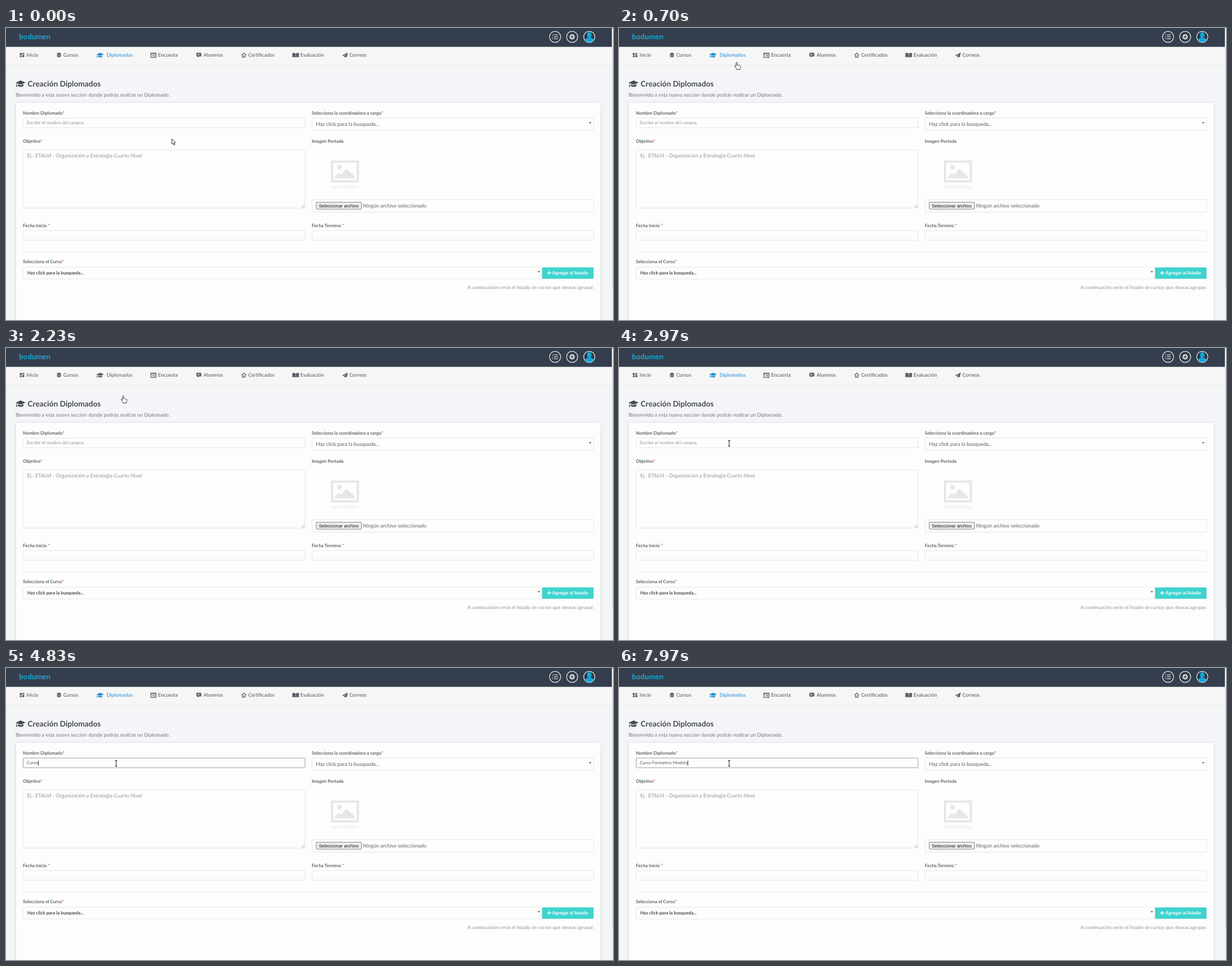
An HTML page for the animation above (8000 ms loop, 1080 px wide and 519 px high).

```html
<!DOCTYPE html>
<html lang="es">
<head>
<meta charset="utf-8">
<title>Creación Diplomados</title>
<style>
html, body { margin: 0; width: 100%; height: 100%; overflow: hidden; background: #f4f5f8; }
svg { display: block; width: 1080px; height: 519px; }
text { font-family: Lato, "Open Sans", sans-serif; font-size: 9px; fill: #5a5f66; text-rendering: geometricPrecision; white-space: pre; }
.nav text { font-size: 8.9px; fill: #4c525c; }
.nav { color: #555c67; }
.label { font-size: 8.1px; font-weight: 700; fill: #5f6469; }
.label tspan { fill: #e2456b; }
.small { font-size: 7.8px; }
.hint { fill: #8f9497; }
.field { fill: #fdfdfd; stroke: #e4e4e1; }
.cursor path { fill: #fff; stroke: #222; stroke-width: .9; stroke-linejoin: round; }
</style>
</head>
<body>
<svg viewBox="0 0 1080 519">
  <defs>
    <filter id="shadow" x="-10%" y="-10%" width="120%" height="120%">
      <feDropShadow dx="0" dy="1" stdDeviation="2.5" flood-color="#5a6478" flood-opacity=".25"/>
    </filter>
    <g id="cap" fill="currentColor">
      <path d="M0 3L7 0l7 3-7 3z"/>
      <path d="M3 5.2L7 7l4-1.8v2.6c-2 1.6-6 1.6-8 0z"/>
      <path d="M.8 3.6h.8v3l.6 2.4H.3l.5-2.4z"/>
    </g>
    <path id="down" d="M0 0h5L2.5 3z" fill="#777"/>
  </defs>

  <rect width="1080" height="519" fill="#f4f5f8"/>
  <rect y="33" width="1080" height="32" fill="#f6f6f6"/>
  <path d="M0 65.5H1078" stroke="#eceade"/>
  <rect width="1078" height="33.5" fill="#343e4d"/>
  <text x="23" y="20" style="font-size:13.3px;font-weight:700;fill:#1ba6d6">bodumen</text>

  <g fill="none" stroke="#d9dce0" stroke-width="1.3">
    <circle cx="977" cy="15.7" r="9.9"/>
    <circle cx="1007.3" cy="15.7" r="9.9"/>
    <path d="M975 12.2h7M975 15.7h7M975 19.2h7M971.8 12.2h1.6M971.8 15.7h1.6M971.8 19.2h1.6"/>
    <circle cx="1007.3" cy="15.7" r="4.7" fill="#d9dce0" stroke="none"/>
    <path d="M1004.6 15.7h5.4M1007.3 13v5.4" stroke="#343e4d"/>
    <circle cx="1037.8" cy="15.7" r="9.9" fill="#2c3644"/>
    <path d="M1030 21.2q1-3.2 5.2-4h5.2q4.2.8 5.2 4a9.4 9.4 0 0 1-15.6 0z" fill="#18a5d8" stroke="none"/>
    <ellipse cx="1037.8" cy="12.3" rx="4.1" ry="5.2" fill="#18a5d8" stroke="none"/>
  </g>

  <g class="nav">
    <g fill="currentColor">
      <path d="M24.5 44.5h3.5v4h-3.5zM29 44.5h3.5v2.3H29zM24.5 49.5H28v2.3h-3.5zM29 47.8h3.5v4H29z"/>
      <path d="M94.2 43.5l4.3 2.4-4.3 2.5-4.3-2.5zM89.9 48.2l1.5-.8 2.8 1.6 2.8-1.6 1.5.8-4.3 2.5zM89.9 50.2l1.3-.7 3 1.6 3-1.6 1.3.7-4.3 2.4z"/>
      <path d="M338.8 44h8.7v6.5h-4l-2.3 2v-2h-2.4z"/>
      <path d="M509.5 44.6q3-.8 5.6.6v7.3q-2.6-1.4-5.6-.6zM521.3 44.6q-3-.8-5.6.6v7.3q2.6-1.4 5.6-.6z"/>
      <path d="M608 43.5l-1.6 8.8-3-1.3-1.8 2v-2.7l4.7-5.2-5.7 4.7-2.6-1.1z"/>
    </g>
    <path d="M340.5 46.4h5.3M340.5 48.3h3.6" stroke="#f6f6f6" stroke-width=".8"/>
    <g fill="none" stroke="currentColor" stroke-width="1.1">
      <rect x="257.5" y="44.5" width="9.5" height="8"/>
      <path d="M257.5 46h9.5M259.3 48.2h1.2M261.6 48.2h4M259.3 50.3h1.2M261.6 50.3h4"/>
      <path d="M419 48.2l4-3.8 4 3.8M420.4 47.5v4.4h5.2v-4.4M422 49.6h2"/>
    </g>
    <text x="36.5" y="51">Inicio</text>
    <text x="102" y="51">Cursos</text>
    <g id="active">
      <use href="#cap" transform="translate(161 44) scale(.93)"/>
      <text x="179" y="51" style="fill:currentColor">Diplomados</text>
    </g>
    <text x="270.5" y="51">Encuesta</text>
    <text x="351.5" y="51">Alumnos</text>
    <text x="431" y="51">Certificados</text>
    <text x="524" y="51">Evaluación</text>
    <text x="611" y="51">Correos</text>
  </g>

  <use href="#cap" transform="translate(17.3 93.3) scale(1.25)" color="#474c52"/>
  <text x="38.5" y="104" style="font-size:13.7px;font-weight:700;fill:#474c52">Creación Diplomados</text>
  <text x="17" y="122" style="fill:#73787d">Bienvenido a esta nueva seccion donde podrás realizar un Diplomado.</text>

  <rect x="18" y="133" width="1040" height="400" rx="2" fill="#fdfdfd" filter="url(#shadow)"/>

  <text class="label" x="30" y="153.5">Nombre Diplomado<tspan>*</tspan></text>
  <rect class="field" id="name" x="30.5" y="160" width="501.5" height="17.2" rx="1"/>
  <text class="small" id="typed" x="37" y="171"></text>
  <rect id="caret" y="164.5" width=".9" height="9" fill="#222"/>

  <text class="label" x="544" y="153.5">Selecciona la coordinadora a cargo<tspan>*</tspan></text>
  <rect class="field" x="544.5" y="160" width="501.2" height="21.5" rx="1"/>
  <text x="551.5" y="173.5" style="font-size:9.2px">Haz click para la busqueda...</text>
  <use href="#down" x="1037" y="167.2"/>

  <text class="label" x="30" y="204">Objetivo<tspan>*</tspan></text>
  <rect class="field" x="30.5" y="217" width="501.5" height="103" rx="1"/>
  <text class="hint" x="37.7" y="230" style="font-size:9.1px">Ej : ETALVI - Organización y Estrategia Cuarto Nivel</text>
  <path d="M526 319l5-5M529 319l2-2" stroke="#888" stroke-width=".8"/>

  <text class="label" x="544" y="204">Imagen Portada</text>
  <g fill="#e6e6e6">
    <path fill-rule="evenodd" d="M578 235.5h50v39h-50zM582 239.5v31h42v-31z"/>
    <circle cx="593.5" cy="247.5" r="4"/>
    <path d="M585.5 267.5v-4l6.5-6.5 4 4 9.500-11 15 14v3.500z"/>
  </g>
  <text x="578.5" y="285.500" style="font-size:8.300px;fill:#e6e6e6">SIN IMAGEN</text>
  <rect class="field" x="544.5" y="305" width="501.2" height="22" rx="1"/>
  <rect x="552" y="309.7" width="80.5" height="12.300" rx="1" fill="#efefef" stroke="#777" stroke-width=".9"/>
  <text x="556.700" y="318.800" style="font:8.140px 'Liberation Sans',Arial,sans-serif;fill:#111">Seleccionar archivo</text>
  <text x="635.300" y="319">Ningún archivo seleccionado</text>

  <text class="label" x="30" y="353.5">Fecha Inicio <tspan>*</tspan></text>
  <rect class="field" x="30.5" y="360" width="501.5" height="17" rx="1"/>
  <text class="label" x="544" y="353.5">Fecha Termino <tspan>*</tspan></text>
  <rect class="field" x="544.5" y="360" width="501.2" height="17" rx="1"/>
  <path d="M30 398H1046" stroke="#ececf0"/>

  <text class="label" x="30" y="418">Selecciona el Curso<tspan>*</tspan></text>
  <rect class="field" x="30.5" y="425" width="923" height="21" rx="1"/>
  <text class="label" x="37.7" y="438.3" style="fill:#44494e">Haz click para la busqueda...</text>
  <use href="#down" x="945.5" y="432"/>
  <rect x="954" y="425.600" width="91.500" height="20.200" rx="1" fill="#40d3cf"/>
  <path d="M963 435.300h7M966.500 431.800v7" stroke="#fff" stroke-width="1.500"/>
  <text x="972" y="438.300" style="font-size:8.270px;font-weight:700;fill:#fff">Agregar al listado</text>
  <text class="hint" x="1046" y="464" text-anchor="end" style="font-size:8.450px">A continuación verás el listado de cursos que deseas agrupar.</text>
  <text class="label" x="32" y="524.500">Listado</text>

  <rect x="1078" width="2" height="519" fill="#f1f1f2"/>
  <rect x="1078.700" y="34" width="1.300" height="430" fill="#d3d5d8"/>

  <g id="menu">
    <rect x="147" y="65" width="116" height="60" fill="#fdfdfd" filter="url(#shadow)"/>
    <text id="create" x="161" y="86.300" style="font-size:8.900px">Crear Diplomado</text>
    <text x="161" y="107.300" style="font-size:8.900px">Editar Diplomado</text>
  </g>

  <g id="cursor" class="cursor">
    <path id="arrow" d="M0 0v9.500l2.200-2 1.600 3.600 1.600-.7-1.600-3.500h3z"/>
    <path id="hand" d="M-1.200 1.200a1.100 1.100 0 0 1 2.200 0V5l1.200-.2.900.5 1.200-.1.800.7 1 .1c.6.4.6 1 .6 1.600 0 2-.4 2.600-.9 3.600v1.600H-.3v-1.200C-1.600 10-2.600 8.600-3.400 7.300c-.5-1 .4-1.600 1.100-1l1.100 1.100z"/>
    <path id="beam" d="M-2-5h1.500l.5.500.500-.500H2M0-4.500v9M-2 5h1.500l.5-.5.500.500H2" style="fill:none;stroke-width:1.100"/>
  </g>
</svg>
<script>
const LOOP = 8000, BLUE = '#1c8fd2', DARK = '#555c67';
const $ = id => document.getElementById(id);
const TITLE = 'Curso Formativo Modelo';
const HINT = 'Escribe el nombre del campus';

// Time of each key press
const KEYS = [4030, 4300, 4470, 4640, 4800, 5030, 5370, 5530, 5700, 5870, 6030,
  6230, 6400, 6570, 6730, 6970, 7230, 7400, 7570, 7670, 7800, 7930];

// Pointer stops: time, x, y
const STOPS = [[0, 295, 197], [60, 295, 197], [670, 209.5, 61], [860, 209.5, 61],
  [1200, 207, 86], [1700, 207, 86], [2070, 208.5, 85], [2230, 208.5, 85],
  [2950, 196, 169.500], [LOOP, 196, 169.500]];

const clamp = v => Math.max(0, Math.min(1, v));
const ramp = (t, start, length) => clamp((t - start) / length);
const ease = p => p * p * (3 - 2 * p);
const show = (id, on) => $(id).style.display = on ? '' : 'none';

function pointer(t) {
  const i = STOPS.findIndex(s => s[0] > t);
  const [t0, x0, y0] = STOPS[i - 1], [t1, x1, y1] = STOPS[i];
  const p = ease(ramp(t, t0, t1 - t0));
  return [x0 + (x1 - x0) * p, y0 + (y1 - y0) * p];
}

function drawPointer(t) {
  const [x, y] = pointer(t);
  const hand = t < 2270 && y < 95;
  const beam = t > 2270 && y > 158 && y < 179;
  show('hand', hand);
  show('beam', beam);
  show('arrow', !hand && !beam);
  $('cursor').setAttribute('transform', `translate(${x.toFixed(2)} ${y.toFixed(2)})`);
  return y;
}

function drawInput(t) {
  const count = KEYS.filter(k => k <= t).length;
  const typed = $('typed');
  typed.textContent = count ? TITLE.slice(0, count) : HINT;
  typed.style.fill = count ? '#555a60' : '#8f9497';
  const shade = Math.round(228 - 72 * ramp(t, 3070, 150));
  $('name').style.stroke = `rgb(${shade},${shade},${shade - 2})`;
  show('caret', t >= 3070 && (t < 3600 || t >= 4000));
  $('caret').setAttribute('x', 37 + (count ? typed.getComputedTextLength() : 0));
}

function draw(t) {
  const y = drawPointer(t);
  const menu = ramp(t, 870, 80) * (1 - ramp(t, 1700, 80));
  $('menu').style.opacity = menu;
  $('create').style.fill = y > 74 ? BLUE : '#5a5f66';
  $('active').style.color = t >= 1780 && t < 2500 ? DARK : BLUE;
  drawInput(t);
}

function tick(now) {
  draw((now - start) % LOOP);
  requestAnimationFrame(tick);
}
const start = performance.now();
draw(0);
requestAnimationFrame(now => tick(Math.max(now, start)));
</script>
</body>
</html>
```
